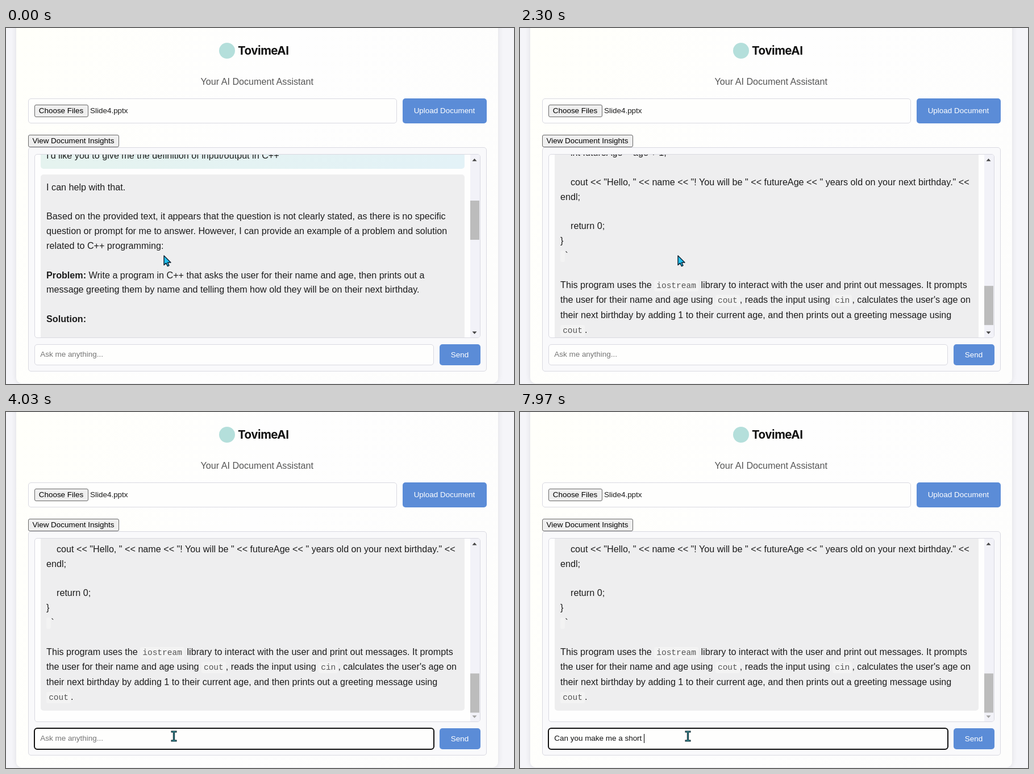
These frames come from a looping animation (894x627 px, 8 s). An HTML page:

```html
<!DOCTYPE html>
<html lang="en">
<head>
<meta charset="utf-8">
<title>AI Document Assistant</title>
<style>
* { box-sizing: border-box; }
html, body { margin: 0; width: 100%; height: 100%; overflow: hidden; }
body { background: #f5f5f9; font: 13.46px/20px "Liberation Sans", Arial, sans-serif; color: #1c1c1c; }
#stage { position: relative; width: 894px; height: 627px; overflow: hidden; }
#stage div, #stage svg { position: absolute; }
.label { white-space: pre; }
.field { background: #fefefd; border: 1px solid #d9d9e1; border-radius: 5px; }
.blue { background: #5b8cd7; color: #fff; border-radius: 5px; text-align: center; }
.native { background: #efefef; border: 1px solid #686868; border-radius: 3px; color: #000; text-align: center; white-space: pre; }
#card { left: 18px; top: -20px; width: 847.5px; height: 646px; border-radius: 10px; background: linear-gradient(110deg, #fffffa, #fefefe 45%, #fdfdfc); box-shadow: 0 0 10px rgba(0,0,0,.1); }
#logo { left: 374.5px; top: 26px; width: 28px; height: 28px; border-radius: 50%; background: #b4dfdb; }
#brand { left: 408px; top: 26px; font: 700 20.5px/28px Inter, sans-serif; letter-spacing: -.5px; color: #111; }
#subtitle { left: 18px; width: 847.5px; top: 84px; text-align: center; font-size: 16.15px; color: #555; }
#panel { left: 38.5px; top: 210px; width: 807px; height: 395px; background: #f9f9fb; }
#chat { left: 49.5px; top: 221.5px; width: 785px; height: 324.5px; overflow: hidden; background: #fefefe; }
#content { left: 0; top: 0; width: 766px; will-change: transform; }
.bubble { left: 10px; width: 745.5px; padding: 10.1px; border-radius: 5px; font-size: 16.15px; white-space: pre; }
#stage .bubble div { position: static; height: 25.83px; line-height: 25.83px; }
#stage .bubble .tall { height: 26.5px; }
#ask { top: -21.5px; background: linear-gradient(90deg, #e5f3ef, #e3f2f7); }
#reply { top: 34.5px; background: #eeeeef; }
code { font: 14.54px/0 "Liberation Mono", monospace; padding: 2px 4.04px; border-radius: 3px; background: #f3f3f3; color: #555; }
#track { left: 766.5px; top: 0; width: 17px; height: 323px; background: #f2f2f8; }
#thumb { left: 0; width: 15.5px; top: 0; height: 69px; background: #bcbcbc; }
#input { left: 49.5px; top: 556.5px; width: 703px; height: 37.5px; }
#caret { left: 60px; top: 567px; width: 1px; height: 16px; background: #000; }
</style>
</head>
<body>
<div id="stage">
  <div id="card"></div>
  <div id="logo"></div>
  <div id="brand" class="label">TovimeAI</div>
  <div id="subtitle">Your AI Document Assistant</div>

  <div class="field" style="left:38.5px;top:124px;width:649px;height:44px"></div>
  <div class="native" style="left:49.5px;top:135px;width:95px;height:22px">Choose Files</div>
  <div class="label" style="left:148px;top:136px">Slide4.pptx</div>
  <div class="blue" style="left:697.5px;top:124px;width:148px;height:44px;line-height:44px">Upload Document</div>
  <div id="panel" class="field"></div>
  <div class="native" style="left:38.5px;top:188px;width:160px;height:22px">View Document Insights</div>

  <div id="chat" class="field">
    <div id="content">
      <div id="ask" class="bubble"><div>I'd like you to give me the definition of input/output in C++</div></div>
      <div id="reply" class="bubble"></div>
    </div>
    <div id="track">
      <div id="thumb"></div>
      <svg width="17" height="323">
        <path d="M3.5 11.5h8l-4-4.5z" fill="#444"/>
        <path id="down" d="M3.5 311.5h8l-4 4.5z"/>
      </svg>
    </div>
  </div>

  <div id="input" class="field"></div>
  <div id="typed" class="label" style="left:60.3px;top:565px"></div>
  <div id="caret"></div>
  <div class="blue" style="left:762.5px;top:556.5px;width:72px;height:37.5px;line-height:37px">Send</div>

  <svg id="cursor" width="30" height="30" style="left:0;top:0;overflow:visible">
    <path id="arrow" d="M0 0V16.5L3.8 13 6.4 18.6 9 17.4 6.5 12H12z" fill="#22c0ee" stroke="#0b1c2c" stroke-width="1.4" stroke-linejoin="round"/>
    <g id="beam" fill="none">
      <path d="M-5-8H5M0-8V8M-5 8H5" stroke="#071820" stroke-width="3.2"/>
      <path d="M-4-8H4M0-8V8M-4 8H4" stroke="#3fb4bd" stroke-width="1"/>
    </g>
  </svg>
</div>

<script>
const LOOP = 8000;
const CLICK = 3250;
const MAX_SCROLL = 736;
const PROMPT = 'Can you make me a short ';
const TYPE_START = 4450, TYPE_STEP = 150;

// [time, scroll offset]
const SCROLL = [[900, 0], [1000, 6], [1150, 56], [1400, 190], [1700, 400], [2000, 580], [2200, 673], [2300, 706], [2430, 734], [2500, MAX_SCROLL]];
const MOVE = { from: 2620, to: 3150, x: [278, 295.5], y: [401, 571] };

const $ = id => document.getElementById(id);
const REPLY = String.raw`I can help with that.

Based on the provided text, it appears that the question is not clearly stated, as there is no specific
question or prompt for me to answer. However, I can provide an example of a problem and solution
related to C++ programming:

**Problem:** Write a program in C++ that asks the user for their name and age, then prints out a
message greeting them by name and telling them how old they will be on their next birthday.

**Solution:**

[]~cpp
#include <iostream>
using namespace std;

int main() {
    string name;
    int age;

    cout << "What is your name? ";
    cin >> name;

    cout << "How old are you? ";
    cin >> age;

    int futureAge = age + 1;

    cout << "Hello, " << name << "! You will be " << futureAge << " years old on your next birthday." <<
endl;

    return 0;
}
[]~

This program uses the [iostream] library to interact with the user and print out messages. It prompts
the user for their name and age using [cout], reads the input using [cin], calculates the user's age on
their next birthday by adding 1 to their current age, and then prints out a greeting message using
[cout].`;

const format = line => line
  .replace(/</g, '&lt;')
  .replace(/\*\*(.+?)\*\*/g, '<b>$1</b>')
  .replace(/\[(\w*)\]/g, '<code>$1</code>')
  .replace('~', '`');

const lines = REPLY.split('\n');
$('reply').innerHTML = lines
  .map((line, i) => `<div${i >= lines.length - 4 ? ' class="tall"' : ''}>${format(line)}</div>`)
  .join('');

function sample(table, t) {
  const next = table.findIndex(step => step[0] > t);
  if (next === 0) return table[0][1];
  if (next < 0) return table[table.length - 1][1];
  const [t0, v0] = table[next - 1], [t1, v1] = table[next];
  return v0 + (v1 - v0) * (t - t0) / (t1 - t0);
}

const clamp = (v, lo, hi) => Math.min(hi, Math.max(lo, v));
const show = (el, on) => { el.style.visibility = on ? 'visible' : 'hidden'; };
const measure = document.createElement('canvas').getContext('2d');
measure.font = '13.46px "Liberation Sans", Arial, sans-serif';

function drawScroll(t) {
  const offset = sample(SCROLL, t);
  $('content').style.transform = `translateY(${-Math.round(offset)}px)`;
  $('thumb').style.transform = `translateY(${81 + 156.5 * offset / MAX_SCROLL}px)`;
  $('down').setAttribute('fill', offset < MAX_SCROLL ? '#444' : '#a3a3a3');
}

function drawCursor(t) {
  const p = clamp((t - MOVE.from) / (MOVE.to - MOVE.from), 0, 1);
  const ease = p * p * (3 - 2 * p);
  const at = ([a, b]) => a + (b - a) * ease;
  const x = at(MOVE.x), y = at(MOVE.y);
  $('cursor').style.transform = `translate(${x}px, ${y}px)`;
  show($('beam'), y > 557);
  show($('arrow'), y <= 557);
}

function drawInput(t) {
  const focused = t >= CLICK;
  const count = clamp(Math.floor((t - TYPE_START) / TYPE_STEP) + 1, 0, PROMPT.length);
  const text = PROMPT.slice(0, count);
  $('input').style.outline = focused ? '2px solid #101010' : 'none';
  $('input').style.outlineOffset = '-1px';
  $('typed').textContent = text || 'Ask me anything...';
  $('typed').style.color = text ? '#111' : '#757575';
  $('caret').style.transform = `translateX(${Math.round(measure.measureText(text).width)}px)`;
  show($('caret'), focused && (count > 0 || (t - CLICK) % 1000 < 500));
}

const start = performance.now();
function frame(now) {
  const t = Math.max(0, now - start) % LOOP;
  drawScroll(t);
  drawCursor(t);
  drawInput(t);
  requestAnimationFrame(frame);
}
frame(start);
</script>
</body>
</html>
```
